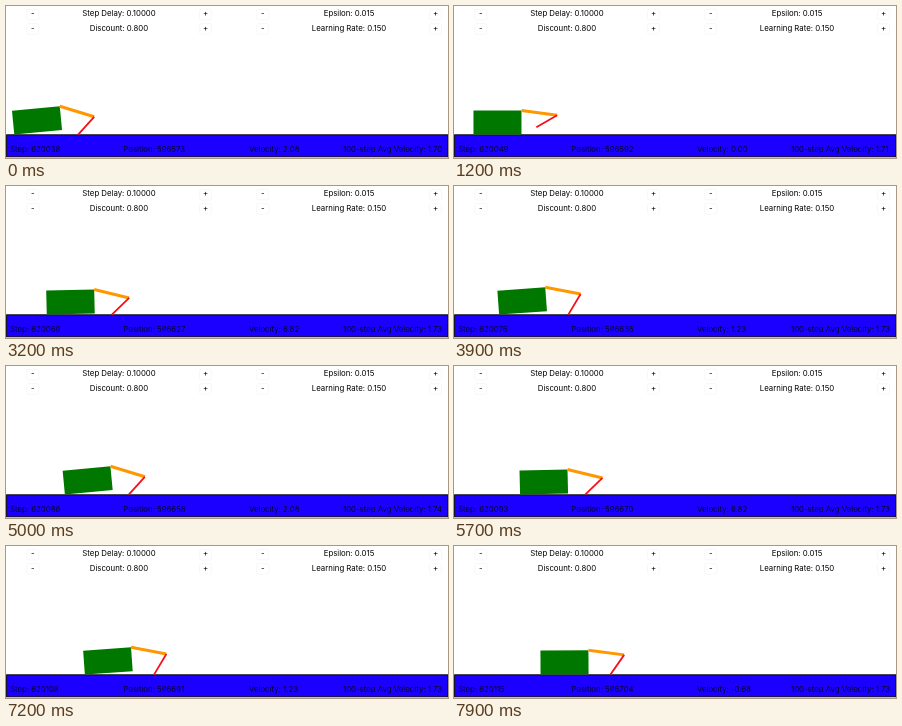
An HTML page for the animation above (8 s loop, 442 by 152 pixels).

```html
<!DOCTYPE html>
<html lang="en">
<head>
<meta charset="utf-8">
<title>Crawling robot</title>
<style>
  html, body { margin: 0; width: 100%; height: 100%; overflow: hidden; background: #fff; }
  svg { display: block; width: 442px; height: 152px; }
  text { font: 7.8px Inter, "Liberation Sans", sans-serif; fill: #000; white-space: pre; }
  .center { text-anchor: middle; }
  #status text { fill: #000; fill-opacity: .8; }
</style>
</head>
<body>
<svg id="stage" viewBox="0 0 442 152">
  <g id="controls"></g>
  <rect x="0.6" y="128.8" width="441" height="22" fill="#1c00ff" stroke="#000" stroke-width="0.9"/>
  <polygon id="body" fill="#007800"/>
  <line id="arm" stroke="#ff9800" stroke-width="3"/>
  <line id="hand" stroke="#f2101a" stroke-width="1.8"/>
  <g id="status"></g>
</svg>
<script>
const LOOP = 8000, FRAME = 100, SCALE = 0.6;
const GROUND = 128.6, START_X = 8.25;
const FIRST_STEP = 38, STEP_BASE = 620000;
const START_POS = 573.3, POS_BASE = 596000;
const WIDTH = 80, HEIGHT = 40, ARM = 60, HAND = 40;

// Arm and hand angles of the learned gait, in degrees
const GAIT = [[-7.5, -125], [-15, -125], [-15, -137.5], [-22.5, -137.5],
              [-22.5, -150], [-15, -150], [-7.5, -150], [-7.5, -137.5]];

const $ = id => document.getElementById(id);
const rad = deg => deg * Math.PI / 180;

function add(parent, tag, attrs, content = '') {
  const el = document.createElementNS('http://www.w3.org/2000/svg', tag);
  for (const key in attrs) el.setAttribute(key, attrs[key]);
  el.textContent = content;
  return parent.appendChild(el);
}

function control(x, y, label) {
  const parent = $('controls');
  for (const [dx, sign] of [[-86.3, '-'], [86.5, '+']]) {
    add(parent, 'rect', { x: x + dx - 6, y: y - 7, width: 12, height: 10.5, rx: 2, fill: '#fff', stroke: '#f1f1f1', 'stroke-width': 0.6 });
    add(parent, 'text', { x: x + dx, y, class: 'center' }, sign);
  }
  add(parent, 'text', { x, y, class: 'center' }, label);
}

control(113, 10.4, 'Step Delay: 0.10000');
control(113, 24.6, 'Discount: 0.800');
control(343, 10.4, 'Epsilon: 0.015');
control(343, 24.6, 'Learning Rate: 0.150');

const [stepText, posText, velText, avgText] =
  [4, 117.3, 243, 337].map(x => add($('status'), 'text', { x, y: 146.2 }));

const poseAt = step => GAIT[(step + 5 + GAIT.length * 100) % GAIT.length];

// Hand tip relative to the rear lower corner of an untilted body
function tip([arm, hand]) {
  const a = rad(arm), h = rad(hand);
  return {
    x: WIDTH + ARM * Math.cos(a) + HAND * Math.cos(h),
    y: HEIGHT + ARM * Math.sin(a) + HAND * Math.sin(h)
  };
}

// The body is dragged along while the hand touches the ground
function displacement(from, to) {
  const p = tip(from), q = tip(to);
  if (p.y >= 0 && q.y >= 0) return 0;
  const crossing = p.x - p.y * (q.x - p.x) / (q.y - p.y);
  const reach = s => s.y < 0 ? Math.hypot(s.x, s.y) : crossing;
  return reach(p) - reach(q);
}

function simulate() {
  const history = [0], states = {};
  let average = 1.74;
  for (let step = -250; step <= 120; step++) {
    const velocity = displacement(poseAt(step - 1), poseAt(step));
    const pos = history[history.length - 1] + velocity;
    history.push(pos);
    if (history.length > 100) history.shift();
    if (step > -140) average = 0.9 * average + 0.1 * (pos - history[0]) / history.length;
    // An early exploratory move leaves the averaging window
    const lag = 0.002 + 0.033 * Math.pow(0.9, Math.max(0, step - 49));
    states[step] = { pos, velocity, average: average - lag };
  }
  return states;
}

const states = simulate();
const origin = states[FIRST_STEP].pos;

function setLine(el, [x1, y1], [x2, y2]) {
  Object.entries({ x1, y1, x2, y2 }).forEach(([key, v]) => el.setAttribute(key, v.toFixed(3)));
}

function draw(time) {
  const frame = Math.floor(time % LOOP / FRAME);
  // A step takes slightly longer than a frame
  const step = FIRST_STEP + frame - Math.floor((frame + 33) / 39);
  const { pos, velocity, average } = states[step];
  const pose = poseAt(step), end = tip(pose);
  const tilt = end.y < 0 ? Math.atan(-end.y / end.x) : 0;
  const travelled = pos - origin;

  const move = ([x, y], length, angle) =>
    [x + SCALE * length * Math.cos(angle), y - SCALE * length * Math.sin(angle)];
  const rear = [START_X + SCALE * travelled, GROUND];
  const front = move(rear, WIDTH, tilt);
  const rearTop = move(rear, HEIGHT, tilt + Math.PI / 2);
  const shoulder = move(rearTop, WIDTH, tilt);
  const elbow = move(shoulder, ARM, tilt + rad(pose[0]));
  const hand = move(elbow, HAND, tilt + rad(pose[1]));

  $('body').setAttribute('points', [rear, front, shoulder, rearTop].join(' '));
  setLine($('arm'), shoulder, elbow);
  setLine($('hand'), elbow, hand);

  stepText.textContent = `Step: ${STEP_BASE + step}`;
  posText.textContent = `Position: ${Math.round(POS_BASE + START_POS + travelled)}`;
  velText.textContent = `Velocity: ${velocity.toFixed(2)}`;
  avgText.textContent = `100-step Avg Velocity: ${average.toFixed(2)}`;
}

let start;
function tick(now) {
  start ??= now;
  draw(now - start);
  requestAnimationFrame(tick);
}
draw(0);
requestAnimationFrame(tick);
</script>
</body>
</html>
```
